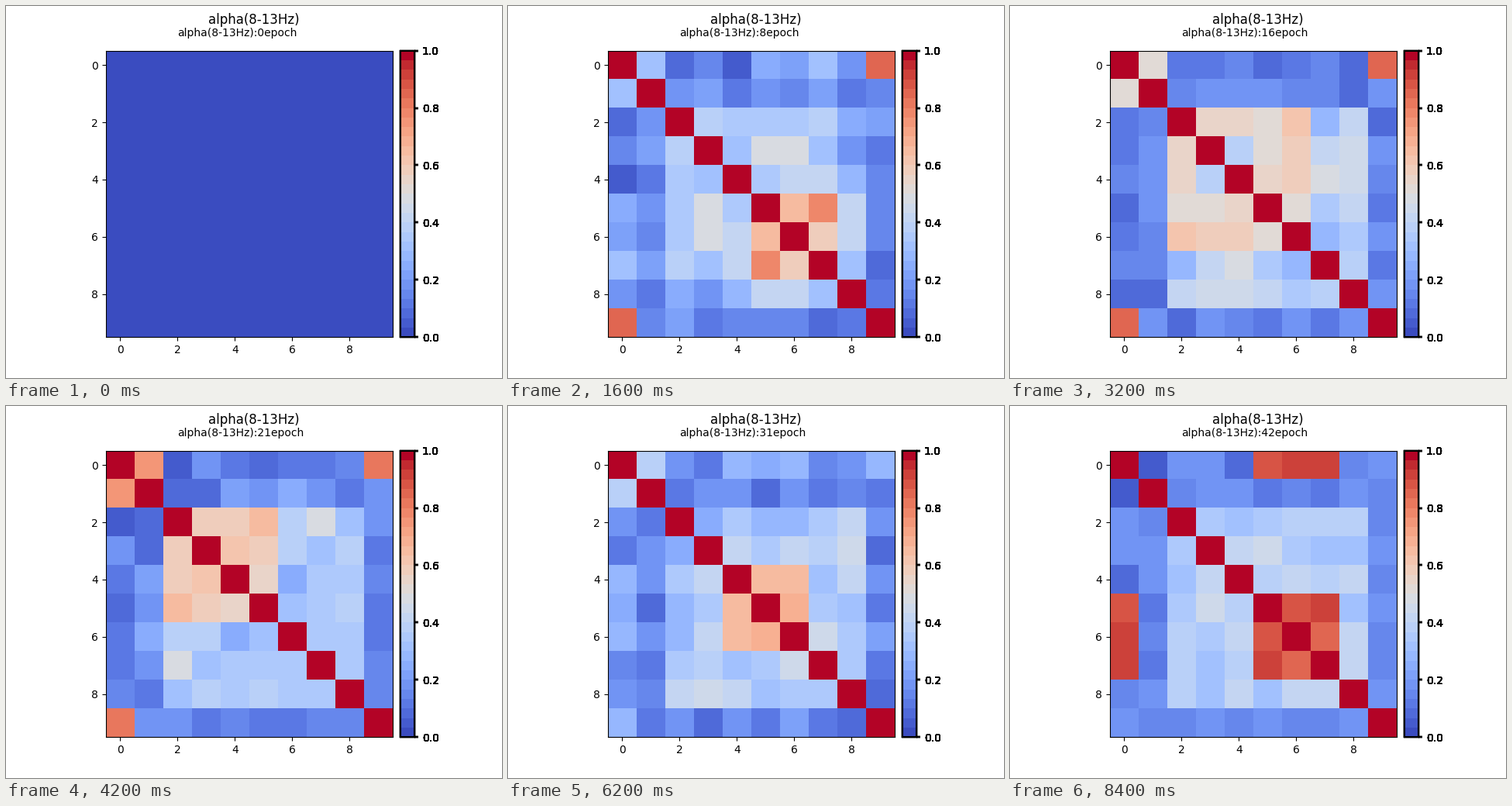
These frames come from a looping animation (640x480 px, 8600 ms). A matplotlib script:

```python
import matplotlib.pyplot as plt
import numpy as np
from matplotlib.animation import FuncAnimation

W, H, DPI = 640, 480, 100
N, EPOCHS, STEP_MS = 10, 43, 200
BAND = "alpha(8-13Hz)"

# A cluster of coupled channels drifts along the diagonal. Key points:
# epoch, first and last channel, level inside the cluster,
# then channel 0's coupling to the cluster, channel 1 and channel 9.
KEYS = np.array([
    (4, 8, 9, .75, .53, .60, .53),
    (11, 2, 6, .50, .06, .28, .98),
    (21, 2, 5, .58, .12, .65, .76),
    (27, 3, 5, .62, .30, .22, .33),
    (36, 5, 8, .86, .18, .53, .40),
    (42, 5, 7, .88, .92, .05, .22),
])


def state(epoch):
    return [np.interp(epoch, KEYS[:, 0], col) for col in KEYS.T[1:]]


def coherence(epoch):
    if epoch == 0:
        return np.zeros((N, N))
    first, last, level, hub, link1, link9 = state(epoch)
    cluster = slice(round(first), round(last) + 1)

    m = np.full((N, N), .15)
    m[2:9, 2:9] = .36
    m[cluster, cluster] = level
    m[0, cluster] = hub
    m[0, 1], m[0, 9] = link1, link9

    # Noise fades towards both ends of the scale.
    rng = np.random.default_rng(epoch)
    m += rng.normal(0, .3, (N, N)) * m * (1 - m)
    upper = np.triu(np.clip(m, 0, 1), 1)
    return upper + upper.T + np.eye(N)


plt.rcParams["text.kerning_factor"] = 6

fig = plt.figure(figsize=(W / DPI, H / DPI), dpi=DPI)
fig.suptitle(BAND, y=.982)

side = .77 * H
bar, gap = .05 * side, 10
left = (.125 + .9) / 2 * W - (side + gap + bar) / 2

ax = fig.add_axes([left / W, .11, side / W, .77])
im = ax.imshow(coherence(0), cmap=plt.get_cmap("coolwarm", 30), vmin=0, vmax=1)
label = ax.text(2, -1, "")

# Stacked copies give the colour bar its heavy labels.
for _ in range(12):
    cax = fig.add_axes([(left + side + gap) / W, .11, bar / W, .77])
    cbar = fig.colorbar(im, cax=cax)
    cbar.outline.set_linewidth(1.5)
    cax.tick_params(width=1.5)


def update(epoch):
    im.set_data(coherence(epoch))
    label.set_text(f"{BAND}:{epoch}epoch")
    return im, label


anim = FuncAnimation(fig, update, frames=EPOCHS, interval=STEP_MS,
                     repeat=True, repeat_delay=0)
plt.show()
```
